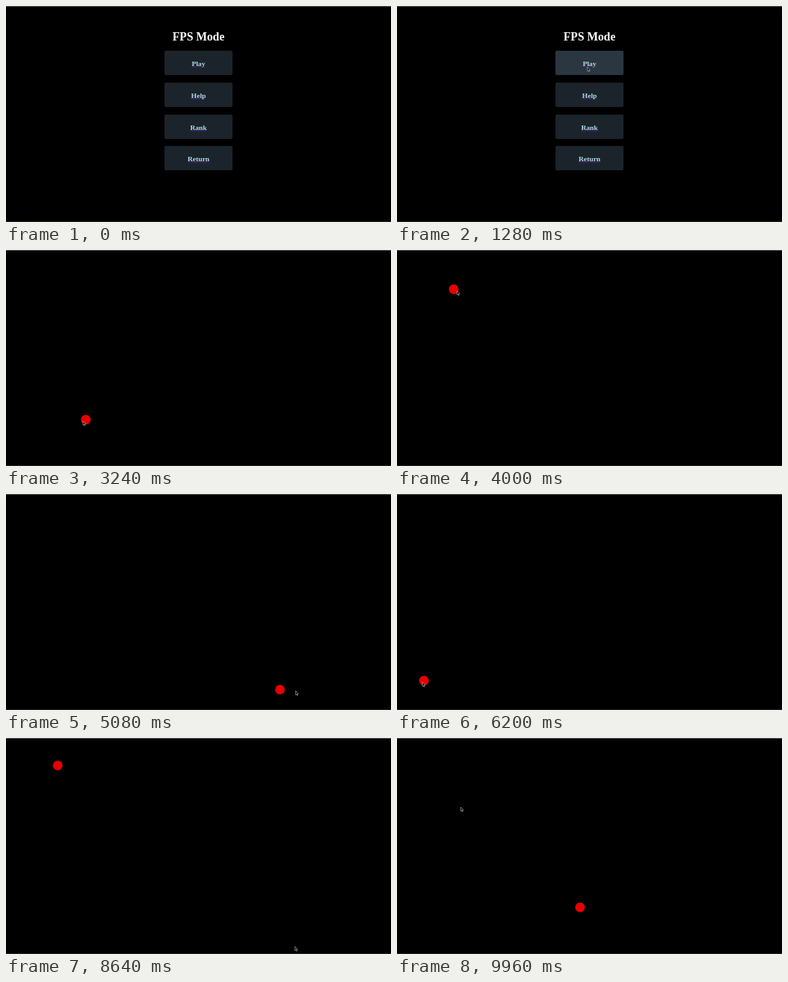
Write an HTML page that moves like this. It is 600 by 338 pixels and loops after 10000 ms.

```html
<!DOCTYPE html>
<html lang="en">
<head>
<meta charset="utf-8">
<title>FPS Mode</title>
<style>
  html, body { margin: 0; width: 100%; height: 100%; overflow: hidden; background: #000; }
  #stage { position: relative; width: 600px; height: 338px; overflow: hidden; }
  #stage::after { content: ""; position: absolute; inset: 0;
    border: solid #606060; border-width: 1px 0; border-bottom-color: #2a2a2a; }
  #menu { font: bold 18.1px "Liberation Serif", serif; text-align: center; }
  h1 { position: absolute; top: 38px; width: 600px; margin: 0; font: inherit; line-height: 20px; color: #fff; }
  .button { position: absolute; left: 247px; width: 106px; height: 38px; border-radius: 2px;
    background: #1c242b; font-size: 11.2px; line-height: 40px; color: #add8e6;
    text-decoration: underline #551a8b; }
  .button.hover { background: #2b3740; }
  svg { position: absolute; left: 0; top: 0; }
</style>
</head>
<body>
<div id="stage">
  <div id="menu"><h1>FPS Mode</h1></div>
  <svg width="600" height="338">
    <circle id="target" r="7.6" fill="#e60000"/>
    <path id="cursor" d="M0 0V6.3L1.4 5 2.4 7.3 3.4 6.9 2.4 4.6H4.3Z" fill="#000" stroke="#ccc" stroke-width=".65"/>
  </svg>
</div>
<script>
const LOOP = 10000, SWING = 8, OVERSHOOT = 36;
const $ = id => document.getElementById(id);
const menu = $('menu'), target = $('target'), cursor = $('cursor');

const buttons = ['Play', 'Help', 'Rank', 'Return'].map((label, i) => {
  const el = document.createElement('div');
  el.className = 'button';
  el.textContent = label;
  el.style.top = 70.4 + i * 49.6 + 'px';
  menu.append(el);
  return el;
});

// Things to click, with the time each becomes the goal: first Play, then the discs.
const goals = [
  [40, 300, 92], [1400, 358, 177], [2300, 124.3, 265.5], [3260, 88.4, 61.3],
  [4200, 192, 269], [4800, 427, 306], [5340, 42, 292], [6360, 477, 299.4],
  [7560, 460, 324], [8620, 80.6, 43], [9860, 285.3, 265]
].map(([time, x, y]) => ({ time, x, y }));

// Clicks land alternately left and right of the centre.
function aim(i) {
  if (i < 0) return { x: 528, y: 236 };
  const side = i % 2 ? 1 : -1;
  return { x: goals[i].x + 4.5 * side, y: goals[i].y - 2.5 * side };
}

// Remaining share of a move: a damped swing that has settled at u = 1.
function remaining(u, damping) {
  const swing = Math.cos(SWING * u) + damping / SWING * Math.sin(SWING * u);
  return Math.exp(-damping * u) * swing * (1 - u ** 8);
}

function mouseAt(t, i) {
  const from = aim(i - 1), to = aim(i);
  const dx = from.x - to.x, dy = from.y - to.y;
  const end = i + 1 < goals.length ? goals[i + 1].time : LOOP + 900;
  const u = (t - goals[i].time) / (end - goals[i].time);
  const damping = Math.max(2, SWING / Math.PI * Math.log(Math.hypot(dx, dy) / OVERSHOOT));
  // The shorter axis lags, which bends the path.
  const lead = remaining(u, damping), lag = remaining(u ** 1.35, damping);
  const wide = Math.abs(dx) > Math.abs(dy);
  return { x: to.x + dx * (wide ? lead : lag), y: to.y + dy * (wide ? lag : lead) };
}

const show = (el, on) => el.style.display = on ? '' : 'none';
const place = (el, { x, y }) => el.setAttribute('transform', `translate(${x} ${y})`);

function draw(t) {
  const i = goals.filter(goal => goal.time <= t).length - 1;
  const mouse = i < 0 ? aim(-1) : mouseAt(t, i);
  show(cursor, i >= 0);
  show(menu, i < 1);
  show(target, i > 0);
  place(cursor, mouse);
  if (i > 0) place(target, goals[i]);
  for (const el of buttons) {
    const x = mouse.x - el.offsetLeft, y = mouse.y - el.offsetTop;
    el.classList.toggle('hover', x > 0 && x < 106 && y > 0 && y < 38);
  }
}

const start = performance.now();
function tick() {
  draw((performance.now() - start) % LOOP);
  requestAnimationFrame(tick);
}
tick();
</script>
</body>
</html>
```
